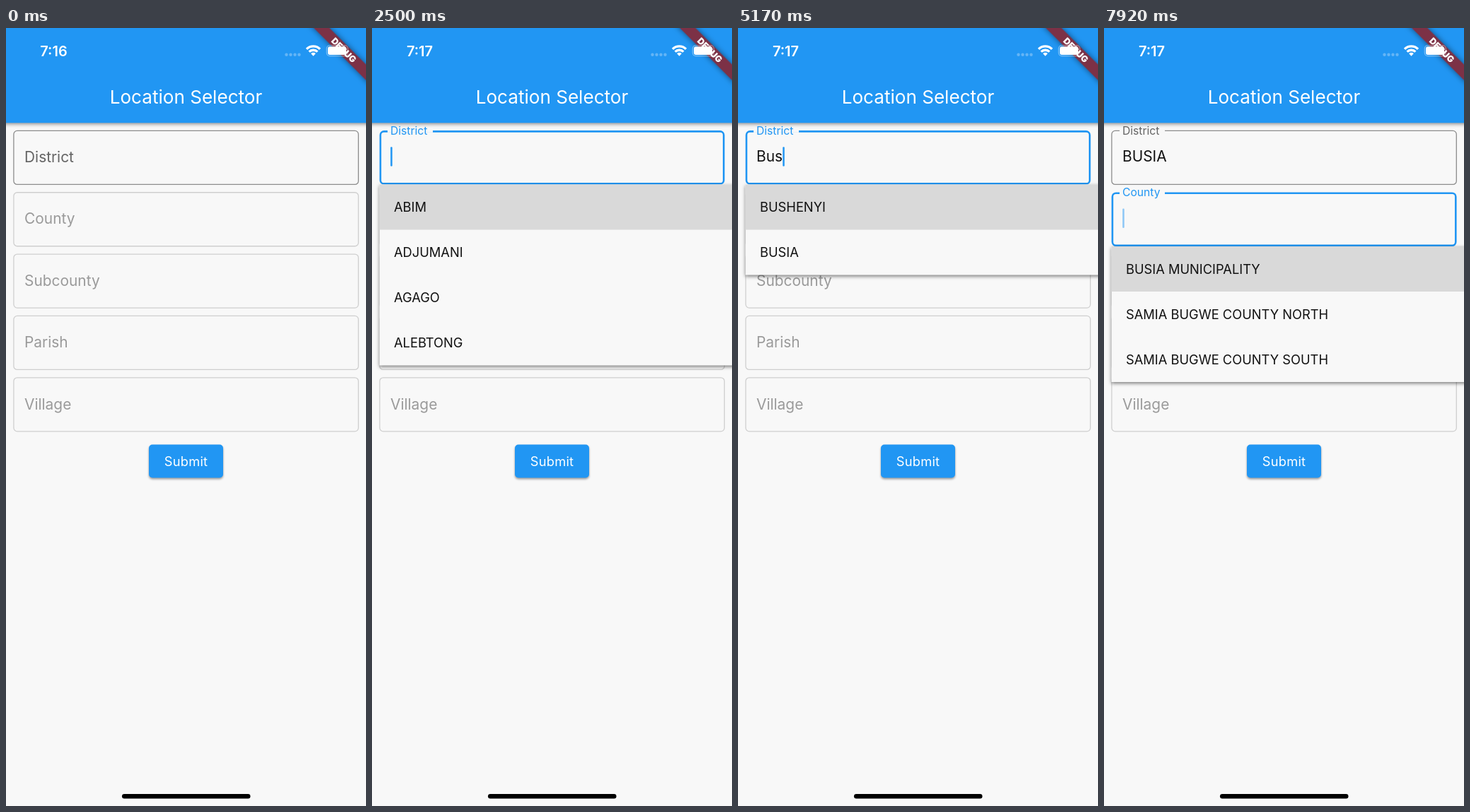
An HTML page for the animation above (8 s loop, 509 by 1101 pixels).

```html
<!DOCTYPE html>
<html lang="en">
<head>
<meta charset="utf-8">
<title>Location Selector</title>
<style>
  html, body { margin: 0; width: 100%; height: 100%; overflow: hidden; background: #f8f8f8; }
  svg { display: block; width: 100%; height: 100%; font-family: Inter, "Open Sans", sans-serif; }
  .middle { text-anchor: middle; fill: #fff; }
  .bar { filter: drop-shadow(0 2px 2.5px rgba(0,0,0,.4)); }
  .button { filter: drop-shadow(0 2px 1.8px rgba(0,0,0,.38)); }
  .menu { filter: drop-shadow(0 2px 2.5px rgba(0,0,0,.5)); }
  .banner { filter: drop-shadow(0 0 4px rgba(0,0,0,.5)); }
</style>
</head>
<body>
<svg viewBox="0 0 509 1101">
  <rect width="509" height="1101" fill="#f8f8f8"/>
  <g id="fields"></g>
  <rect class="button" x="202" y="589.5" width="105" height="47" rx="5" fill="#2196f3"/>
  <text class="middle" x="254.5" y="619.5" font-size="18.3" letter-spacing=".25">Submit</text>
  <rect class="bar" x="-10" y="-10" width="529" height="144.3" fill="#2196f3"/>
  <g id="overLabels"></g>
  <g id="menu"></g>
  <text class="middle" x="254.5" y="107" font-size="26.1">Location Selector</text>

  <g transform="translate(509 0) rotate(45)">
    <rect class="banner" x="-60" y="36.5" width="120" height="15.7" fill="#7c3146"/>
    <text class="middle" y="48.9" font-size="12.6" font-weight="900">DEBUG</text>
  </g>

  <text id="clock" class="middle" x="67.5" y="40" font-size="20" font-weight="600"></text>
  <g fill="#fff" fill-opacity=".3">
    <circle cx="396.5" cy="37.7" r="2.2"/><circle cx="402.5" cy="37.7" r="2.2"/>
    <circle cx="408.5" cy="37.7" r="2.2"/><circle cx="414.5" cy="37.7" r="2.2"/>
  </g>
  <g fill="none" stroke="#fff" stroke-width="3.3">
    <path d="M425 29.9A13.4 13.4 0 0 1 444 29.9M428.6 33.7A8.3 8.3 0 0 1 440.4 33.7"/>
    <path d="M431.2 36.2A4.7 4.7 0 0 1 437.8 36.2L434.5 39.8Z" fill="#fff" stroke="none"/>
  </g>
  <rect x="453.3" y="24.6" width="30" height="15" rx="4.5" fill="none" stroke="#fff" stroke-opacity=".4" stroke-width="1.2"/>
  <rect x="455" y="26.3" width="26" height="11.6" rx="3" fill="#fff"/>
  <rect x="164" y="1084" width="181.5" height="6.4" rx="3.2"/>
</svg>
<script>
const LOOP = 8000, CLOCK_TICK = 920, FOCUS_DISTRICT = 1330, PICK = 5740, FOCUS_COUNTY = 7340;
const BLUE = [33, 150, 243], GREY = [100, 100, 100], DIM = [154, 154, 154];
const OUTLINE = [140, 140, 140], DIM_OUTLINE = [207, 207, 207];
const TEXT_X = 26, FONT = 20.9, ROW = 64;

const typing = [[0, ''], [2900, 'B'], [3150, 'Bu'], [4700, 'Bus'], [PICK, 'BUSIA']];
const bNames = ['BUDAKA', 'BUDUDA', 'BUGIRI', 'BUGWERI'];
const menus = [
  [0, 0, []],
  [FOCUS_DISTRICT, 221.5, ['ABIM', 'ADJUMANI', 'AGAGO', 'ALEBTONG']],
  [2900, 221.5, bNames],
  [4700, 221.5, ['BUSHENYI', 'BUSIA']],
  [PICK, 0, []],
  [FOCUS_COUNTY, 309, ['BUSIA MUNICIPALITY', 'SAMIA BUGWE COUNTY NORTH', 'SAMIA BUGWE COUNTY SOUTH']]
];

const byId = id => document.getElementById(id);
const lerp = (a, b, p) => a + (b - a) * p;
const mix = (a, b, p) => `rgb(${a.map((v, i) => Math.round(lerp(v, b[i], p)))})`;
const latest = (list, t) => list.filter(entry => entry[0] <= t).pop();
const ease = (t, start) => {
  const p = Math.min(1, Math.max(0, (t - start) / 200));
  return p * p * (3 - 2 * p);
};

function add(parent, tag, attrs, text = '') {
  const node = document.createElementNS('http://www.w3.org/2000/svg', tag);
  set(node, attrs);
  node.textContent = text;
  parent.appendChild(node);
  return node;
}
function set(node, attrs) {
  for (const key in attrs) node.setAttribute(key, attrs[key]);
}

const fields = ['District', 'County', 'Subcounty', 'Parish', 'Village'].map((name, i) => {
  const top = 145.4 + i * 87.35, group = byId('fields'), over = byId('overLabels');
  return {
    top,
    box: add(group, 'rect', { fill: 'none', rx: 5 }),
    gap: add(over, 'rect', { y: top - 2.5, height: 5, fill: '#f8f8f8' }),
    label: add(over, 'text', { x: TEXT_X }, name),
    value: add(over, 'text', { x: TEXT_X, y: top + 44, 'font-size': FONT, fill: '#111' }),
    caret: add(over, 'rect', { y: top + 22.8, width: 2.5, height: 27.5, rx: 1.2, fill: '#2196f3' })
  };
});

function drawField(field, { enabled, raised = 0, focus = 0, text = '', caret = 0 }) {
  const inset = lerp(0, 1, focus), { top } = field;
  set(field.box, {
    x: 10.9 + inset, y: top + inset, width: 487.4 - 2 * inset, height: 76 - 2 * inset,
    stroke: mix(enabled ? OUTLINE : DIM_OUTLINE, BLUE, focus),
    'stroke-width': lerp(1.3, 2.6, focus)
  });
  set(field.gap, { x: lerp(54, 22, raised), width: 64 * raised });
  set(field.label, {
    y: lerp(top + 44.7, top + 5.7, raised),
    'font-size': lerp(FONT, FONT * .75, raised),
    fill: mix(enabled ? GREY : DIM, BLUE, focus)
  });
  if (field.value.textContent !== text) field.value.textContent = text;
  const width = text ? field.value.getComputedTextLength() : 0;
  set(field.caret, { x: TEXT_X + .2 + width, opacity: caret });
}

// Stays lit for half a second, then fades out and back in quarter steps.
function blink(age) {
  const phase = age % 1000 / 1000;
  const steps = from => Math.min(4, Math.max(0, Math.floor((phase - from) / .0375))) / 4;
  return 1 - steps(.5) + steps(.85);
}

let shownMenu;
function drawMenu(entry) {
  if (entry === shownMenu) return;
  shownMenu = entry;
  const [, top, names] = entry, menu = byId('menu');
  menu.replaceChildren();
  if (!names.length) return;
  add(menu, 'rect', { class: 'menu', x: 10.5, y: top, width: 520, height: Math.min(262, names.length * ROW), fill: '#f8f8f8' });
  add(menu, 'rect', { x: 10.5, y: top, width: 520, height: ROW, fill: '#d9d9d9' });
  names.forEach((name, i) =>
    add(menu, 'text', { x: 31, y: top + 38.5 + i * ROW, 'font-size': 18.3, fill: '#111' }, name));
}

function draw(t) {
  const time = t < CLOCK_TICK ? '7:16' : '7:17';
  if (byId('clock').textContent !== time) byId('clock').textContent = time;

  const [typedAt, text] = latest(typing, t);
  const raised = ease(t, FOCUS_DISTRICT), moved = ease(t, FOCUS_COUNTY);
  const inDistrict = t >= FOCUS_DISTRICT && t < FOCUS_COUNTY;
  drawField(fields[0], {
    enabled: true, raised, focus: raised * (1 - moved), text,
    caret: inDistrict ? blink(t - Math.max(typedAt, FOCUS_DISTRICT)) : 0
  });
  drawField(fields[1], {
    enabled: t >= PICK, raised: moved, focus: moved,
    caret: t >= FOCUS_COUNTY ? blink(t - FOCUS_COUNTY) : 0
  });
  fields.slice(2).forEach(field => drawField(field, { enabled: false }));
  drawMenu(latest(menus, t));
}

const start = performance.now();
function frame() {
  draw((performance.now() - start) % LOOP);
  requestAnimationFrame(frame);
}
frame();
</script>
</body>
</html>
```
